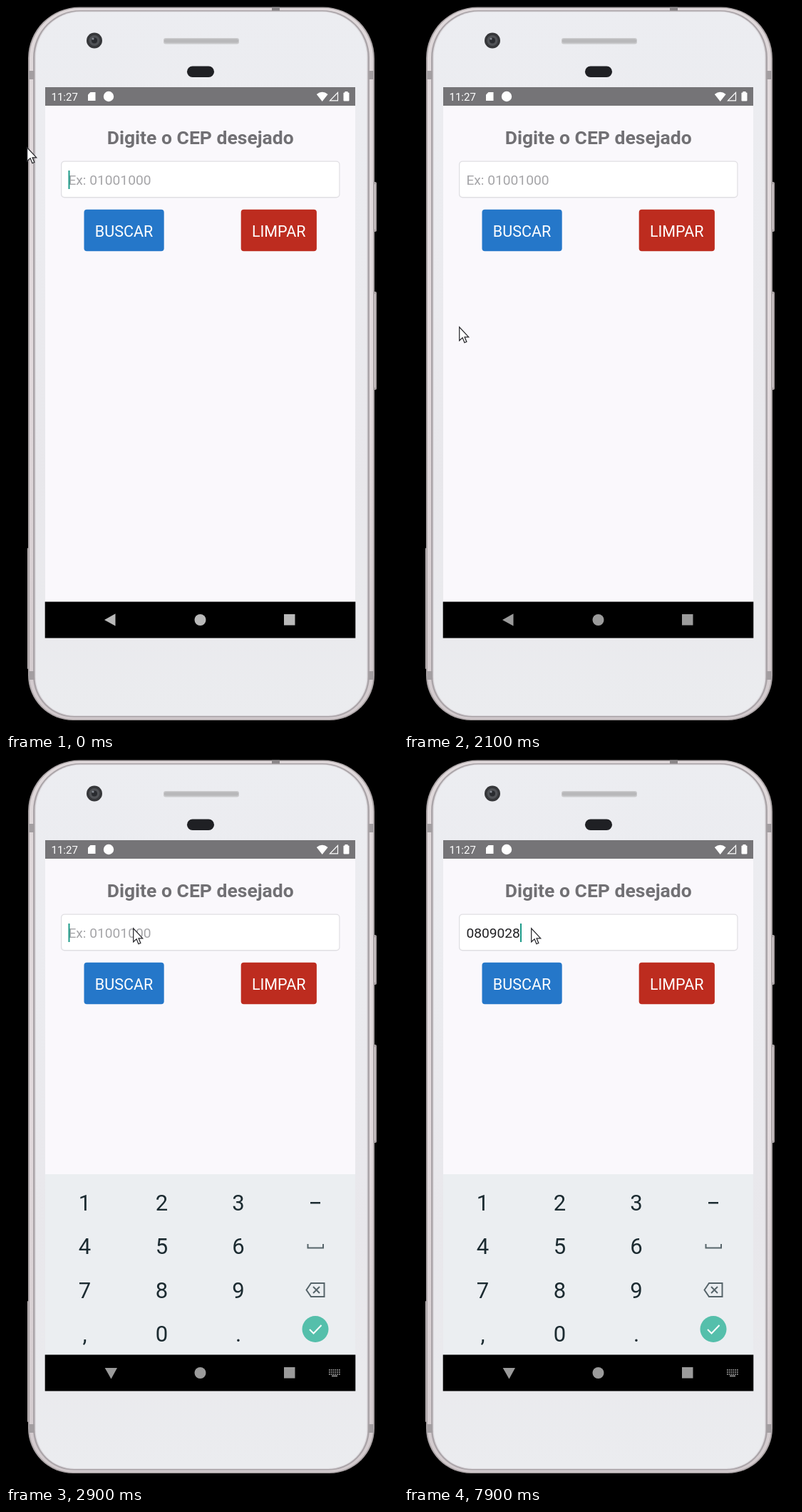
Animation, 550 px wide and 1018 px high, one loop 8 s. Source, as an HTML page with a canvas:

```html
<!DOCTYPE html>
<html lang="pt-BR">
<head>
<meta charset="utf-8">
<title>CEP</title>
<style>
html, body { margin: 0; width: 100%; height: 100%; overflow: hidden; background: #000; }
canvas { display: block; }
</style>
</head>
<body>
<canvas id="stage" width="550" height="1018"></canvas>
<script>
const ctx = document.getElementById('stage').getContext('2d');
const LOOP = 8000, TICK = 100;
const COLS = [110.5, 218.5, 326, 434];
const clamp = v => Math.max(0, Math.min(1, v));

// [time, x, y] of the pointer tip
const POINTER = [
  [0, 29, 198], [100, 60, 205], [700, 366, 224], [800, 366, 224], [1100, 237, 207],
  [1300, 196, 222], [1400, 196, 222], [1700, 90, 516], [2000, 90, 516],
  [2100, 77, 450], [2400, 178, 237]
];
// [time, entered text]
const TYPED = [
  [0, ''], [3600, '0'], [3900, '08'], [4100, '080'], [5900, '0809'],
  [6100, '08090'], [7500, '080902'], [7900, '0809028']
];

function fillRect(x, y, w, h, color, r = 0) {
  ctx.fillStyle = color;
  ctx.beginPath();
  ctx.roundRect(x, y, w, h, r);
  ctx.fill();
}

function circle(x, y, r, color) {
  ctx.fillStyle = color;
  ctx.beginPath();
  ctx.arc(x, y, r, 0, Math.PI * 2);
  ctx.fill();
}

function trace(points, close) {
  ctx.beginPath();
  points.forEach(([x, y]) => ctx.lineTo(x, y));
  if (close) ctx.closePath();
}

function polygon(points, color) {
  trace(points, true);
  ctx.fillStyle = color;
  ctx.fill();
}

function line(points, color, width, close = false) {
  trace(points, close);
  ctx.strokeStyle = color;
  ctx.lineWidth = width;
  ctx.stroke();
}

function text(str, x, y, size, color, align = 'left', weight = 400) {
  ctx.font = `${weight} ${size}px Roboto, sans-serif`;
  ctx.textAlign = align;
  ctx.fillStyle = color;
  ctx.fillText(str, x, y);
}

function verticalGradient(y0, y1, ...colors) {
  const g = ctx.createLinearGradient(0, y0, 0, y1);
  colors.forEach((c, i) => g.addColorStop(i / (colors.length - 1), c));
  return g;
}

// One layer of the phone body, set in from the outer edge.
function shell(dx, dy, color) {
  const top = 72 - dx * 0.8, bottom = 63 - dx * 0.8;
  fillRect(31 + dx, 1.5 + dy, 486 - 2 * dx, 1001.5 - 2 * dy, color, [top, top, bottom, bottom]);
}

function drawPhone() {
  fillRect(0, 0, 550, 1018, '#000');
  for (const [y, h] of [[247, 70], [401, 138]]) {
    fillRect(514, y, 6, h, '#aaa2a4', 2);
    fillRect(515, y + 3, 3, h - 6, '#d9d2d4', 1);
  }
  fillRect(30, 761, 4, 170, '#c0b8ba', 1);
  shell(0, 0, '#aca5a7');
  shell(2, 1.5, verticalGradient(0, 1000, '#dfd8da', '#e2dadd', '#d2cacd'));
  shell(7, 4.5, '#aaa4a8');
  shell(9.5, 6, '#dedce0');
  shell(11, 7, verticalGradient(7, 992, '#ecedf1', '#ebebef', '#e8e7eb', '#ebecef'));
  for (const y of [91, 934]) {
    fillRect(32, y, 8, 12, '#a39ea1');
    fillRect(508, y, 8, 12, '#a39ea1');
  }
  fillRect(373, 1.5, 11, 5, '#8b8789');

  circle(124, 48.5, 11, '#36373a');
  circle(124, 48.5, 7.5, '#505256');
  circle(124, 48.5, 4, '#292b2f');
  circle(122, 46, 1.6, '#858a92');
  fillRect(221, 45, 106, 8.5, '#cacacc', 3);
  fillRect(222, 46.5, 104, 5, '#b8b8ba', 2);
  fillRect(254, 84.5, 38, 15.5, '#1f2024', 7.7);
}

function drawStatusBar() {
  fillRect(55, 114, 435, 26, '#757477');
  text('11:27', 63.5, 133, 15, '#fff');
  polygon([[118.5, 121], [125.5, 121], [125.5, 133], [115, 133], [115, 124.5]], '#fff');
  circle(144, 127, 7.2, '#fff');
  ctx.beginPath();
  ctx.moveTo(443.7, 134);
  ctx.lineTo(435.8, 124);
  ctx.quadraticCurveTo(443.7, 117.5, 451.6, 124);
  ctx.fillStyle = '#fff';
  ctx.fill();
  line([[465.5, 121.5], [465.5, 132.8], [454.5, 132.8]], '#fff', 1.2, true);
  fillRect(473.5, 121.5, 8, 12, '#fff', 1);
  fillRect(475.5, 120, 4, 2, '#fff');
}

function drawForm(value, caretOn) {
  text('Digite o CEP desejado', 272.7, 194, 26.5, '#717074', 'center', 700);
  fillRect(77, 217.5, 391.5, 52, '#e0dfe3', 5);
  fillRect(78.3, 218.8, 389, 49.2, '#fff', 4);
  text(value || 'Ex: 01001000', 87.4, 251.2, 19.2, value ? '#212124' : '#a5a5a8');
  if (caretOn) {
    const width = value ? ctx.measureText(value).width : 0;
    fillRect(87.5 + width, 231, 2, 26, '#1b9a88');
  }
  fillRect(109.5, 285.7, 112.2, 58.5, '#2577c9', 4);
  text('BUSCAR', 165.5, 324.4, 21.5, '#fff', 'center');
  fillRect(329.7, 285.7, 106.2, 58.5, '#bd2c1f', 4);
  text('LIMPAR', 382.7, 324.4, 21.5, '#fff', 'center');
}

function drawKeyboard(u) {
  if (u <= 0) return;
  const ink = '#1c2b31', soft = '#56646a';
  ctx.save();
  ctx.beginPath();
  ctx.rect(55, 140, 435, 747);
  ctx.clip();
  ctx.translate(0, 300 * (1 - u) ** 2);
  ctx.globalAlpha = u;
  fillRect(55, 583, 435, 304, '#ebeef1');
  ['123', '456', '789', ',0.'].forEach((row, r) => {
    ctx.globalAlpha = r === 3 ? clamp(u * 2) : u;
    [...row].forEach((key, c) => text(key, COLS[c], 634 + r * 61.3, 31, ink, 'center'));
  });
  ctx.globalAlpha = u;
  fillRect(427, 622, 14, 2.5, ink);
  line([[423.5, 681], [423.5, 686.5], [445, 686.5], [445, 681]], soft, 2);
  line([[421.5, 745.5], [428, 736], [446.5, 736], [446.5, 755], [428, 755]], soft, 2, true);
  line([[431, 741], [440, 750]], soft, 2);
  line([[440, 741], [431, 750]], soft, 2);
  ctx.globalAlpha = clamp(u * 2);
  circle(434, 800.5, 18.5, '#55bfab');
  ctx.globalAlpha = u;
  line([[426, 801], [431.5, 806.5], [442.5, 795]], '#fff', 2);
  ctx.restore();
}

function drawNavBar(t, u) {
  const blend = 4 * u * (1 - u);
  ctx.globalAlpha = 1 - 0.47 * blend;
  fillRect(54.7, 836.5, 435.6, 50.9, '#000');
  ctx.globalAlpha = 1;
  const glow = Math.max(1 - clamp((t - 100) / 600), blend);
  const level = Math.round(155 + 30 * glow);
  const gray = `rgb(${level},${level},${level})`;
  ctx.save();
  ctx.translate(147, 861.5);
  ctx.rotate(-Math.PI / 2 * clamp((u - 0.5) * 2));
  polygon([[-9, 0.5], [6.5, -8.3], [6.5, 9]], gray);
  ctx.restore();
  circle(272.5, 862, 8, gray);
  fillRect(390, 854, 15.5, 15.5, gray);
  ctx.globalAlpha = clamp(u * 2);
  for (let r = 0; r < 3; r++)
    for (let c = 0; c < 6; c++) fillRect(453 + c * 2.8, 857 + r * 3, 1.7, 1.7, gray);
  fillRect(457, 865.5, 8, 1.7, gray);
  ctx.globalAlpha = 1;
}

function pointerAt(t) {
  const next = POINTER.findIndex(p => p[0] > t);
  if (next < 0) return POINTER[POINTER.length - 1].slice(1);
  const [t0, x0, y0] = POINTER[next - 1], [t1, x1, y1] = POINTER[next];
  const k = (t - t0) / (t1 - t0);
  return [x0 + (x1 - x0) * k, y0 + (y1 - y0) * k];
}

function drawPointer(t) {
  const [x, y] = pointerAt(t);
  ctx.save();
  ctx.translate(x + 0.7, y + 0.8);
  ctx.scale(1.13, 1.15);
  const arrow = [[0, 0], [0, 16.5], [3.9, 13], [6.4, 19], [9, 18], [6.5, 12.2], [11.5, 12.2]];
  polygon(arrow, '#fff');
  line(arrow, '#29292d', 1.1, true);
  ctx.restore();
}

function draw(t) {
  const [since, value] = TYPED.filter(e => e[0] <= t).pop();
  // Typing restarts the blink; an empty field keeps its own phase.
  const phase = value ? t - since : t + 400;
  const caretOn = phase % 1000 < 500;
  const u = clamp((t - 2500) / 400);
  drawPhone();
  fillRect(55, 114, 435, 773, '#faf8fc');
  drawStatusBar();
  drawForm(value, caretOn);
  drawKeyboard(u);
  drawNavBar(t, u);
  drawPointer(t);
}

const start = performance.now();
function frame() {
  const t = (performance.now() - start) % LOOP;
  draw(Math.floor(t / TICK) * TICK);
  requestAnimationFrame(frame);
}
frame();
</script>
</body>
</html>
```
